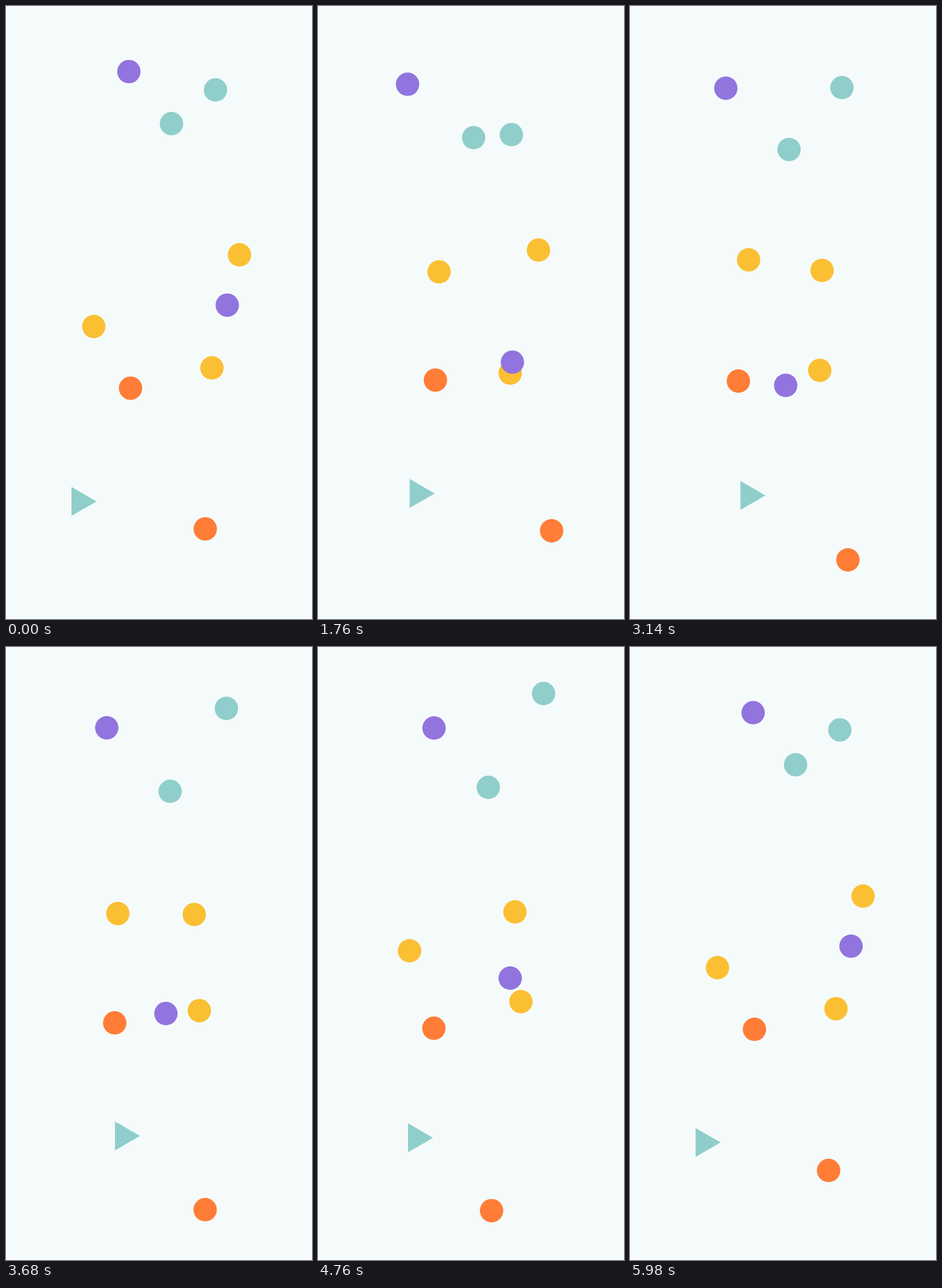
An HTML page with a canvas that plays this animation: 500x1000 px, repeating every 6 s.

```html
<!DOCTYPE html>
<html lang="en">
<head>
<meta charset="utf-8">
<title>Drifting shapes</title>
<style>
  html, body { margin: 0; width: 100%; height: 100%; overflow: hidden; background: #f5fbfb; }
  canvas { display: block; width: 500px; height: 1000px; }
</style>
</head>
<body>
<canvas id="stage" width="500" height="1000"></canvas>
<script>
const LOOP = 6000, STEP = 20;
const PURPLE = '#9174de', TEAL = '#90cecb', YELLOW = '#fbbf33', ORANGE = '#ff7d36';
const ctx = document.getElementById('stage').getContext('2d');

// Periodic drift around a middle value: [cos, sin] swings at 1, 2, 3 turns per loop.
const wave = (mid, ...swings) => angle => swings.reduce(
  (sum, [c, s = 0], i) => sum + c * Math.cos((i + 1) * angle) + s * Math.sin((i + 1) * angle), mid);

function dot(x, y) {
  ctx.arc(x, y, 19.1, 0, Math.PI * 2);
}

function arrow(x, y) {
  ctx.moveTo(x, y - 23.6);
  ctx.lineTo(x + 40.9, y);
  ctx.lineTo(x, y + 23.6);
}

const shape = (color, x, y, outline = dot) => ({ color, x, y, outline });

const shapes = [
  shape(TEAL, wave(342.3, [0, -27.3]), wave(142.6, [-1, 70.6], [-3, 4.3], [-1.7])),
  shape(TEAL, wave(265.5, [6.2, -10.7], [-1.3, 0.6]), wave(217.8, [-16.8, -9.4], [-5.6, 1.5], [-3.5])),
  shape(YELLOW, wave(345.4, [30.8, 27.4], [3.8, 2.1], [1.5]), wave(415.7, [-11.6, -20.9], [1.8, -2])),
  shape(YELLOW, wave(172.5, [-26.2, 17.7], [-2.9, 2.4]), wave(465.8, [55.9, -16.5], [1.1, 0.4])),
  shape(YELLOW, wave(322.8, [13.7, -5.3]), wave(591.3, [-4, 8], [1.2, 3], [1.9])),
  shape(ORANGE, wave(190.6, [12.9, 4.9]), wave(616.3, [5.9, -4.4], [1.3, -1.7])),
  shape(ORANGE, wave(338.5, [-18.5, 45.8], [5.6, 2]), wave(881.6, [-21.3, -37.6], [-5.6, -2.7], [-1.7])),
  shape(PURPLE, wave(172.1, [23.1, -16], [5.6, -1.3]), wave(124.9, [-11.6, -4], [-4.2, -2.8], [-2.1])),
  shape(PURPLE, wave(312.6, [52.7, 16.6], [-3.8]), wave(557.1, [-64.1, 5.2], [-2.5, -2.6], [-2.5])),
  shape(TEAL, wave(145.9, [-36.3, -8.7], [-2.6, -0.6]), wave(800.3, [4.9, -1.5], [3, -0.4]), arrow)
];

function draw(time) {
  const angle = 2 * Math.PI * time / LOOP;
  ctx.fillStyle = '#f5fbfb';
  ctx.fillRect(0, 0, 500, 1000);
  for (const { color, x, y, outline } of shapes) {
    ctx.fillStyle = color;
    ctx.beginPath();
    outline(x(angle), y(angle));
    ctx.fill();
  }
}

function tick() {
  draw(Math.floor(performance.now() % LOOP / STEP) * STEP);
  requestAnimationFrame(tick);
}
tick();
</script>
</body>
</html>
```
